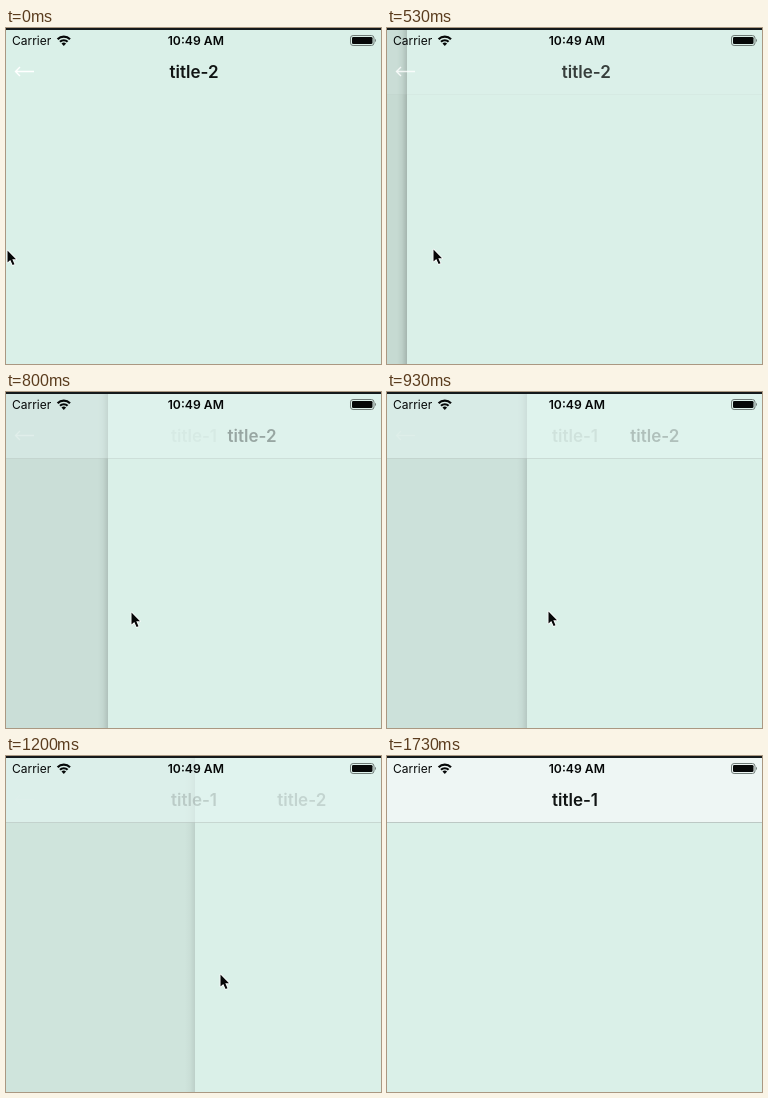
An HTML page for the animation above (2740 ms loop, 375 by 336 pixels).

```html
<!DOCTYPE html>
<html lang="en">
<head>
<meta charset="utf-8">
<title>Swipe back</title>
<style>
html, body { margin: 0; width: 100%; height: 100%; overflow: hidden; background: #daf0e8; }
svg { display: block; width: 100vw; height: 100vh; }
text { font-family: Inter, Roboto, sans-serif; fill: #060808; }
.title { font-size: 17px; font-weight: 600; text-anchor: middle; fill: #101413; }
.status { font-size: 12px; }
.clock { font-size: 12.2px; font-weight: 600; text-anchor: middle; }
</style>
</head>
<body>
<svg viewBox="0 0 375 336">
  <defs>
    <linearGradient id="shade">
      <stop offset="0" stop-color="#000" stop-opacity="0"/>
      <stop offset=".5" stop-color="#000" stop-opacity=".05"/>
      <stop offset="1" stop-color="#000" stop-opacity=".18"/>
    </linearGradient>
  </defs>
  <rect width="375" height="336" fill="#daf0e8"/>
  <rect id="dim" height="336"/>
  <rect id="shadow" width="10" height="336" fill="url(#shade)"/>
  <g id="bar">
    <rect width="375" height="66" fill="#e5f6f3"/>
    <rect id="settled" width="375" height="66" fill="#eef6f4"/>
    <rect y="66" width="375" height="1" fill="#bcc8c4"/>
  </g>
  <path id="back" d="M28 43.5H9.5M14 39L9.5 43.5L14 48" fill="none" stroke="#fff" stroke-width="1.4"/>
  <text id="prev" class="title" x="188" y="50">title-1</text>
  <text id="next" class="title" x="188" y="50">title-2</text>
  <rect width="375" height="2" fill="#14191b"/>
  <text class="status" x="6" y="17">Carrier</text>
  <g fill="none" stroke="#060808" stroke-width="2.2">
    <path d="M51.6 11.2A8.6 8.6 0 0 1 64 11.2"/>
    <path d="M54 13.8A5.4 5.4 0 0 1 61.6 13.8"/>
  </g>
  <path d="M57.8 18L55.5 15.6A3.2 3.2 0 0 1 60.1 15.6Z" fill="#060808"/>
  <text class="clock" x="189.8" y="17">10:49 AM</text>
  <rect x="344.5" y="7.5" width="23.5" height="10" rx="2.6" fill="none" stroke="#6f7b77"/>
  <rect x="346" y="9" width="20.5" height="7" rx="1.3" fill="#060808"/>
  <path d="M369 10.8Q371 12.5 369 14.2Z" fill="#6f7b77"/>
  <path id="cursor" d="M.5 .5V12.5L3.3 10L5.6 15L7.5 14.2L5.3 9.2H9Z"
    fill="#060808" stroke="#fff" stroke-width="1.6" stroke-linejoin="round" paint-order="stroke"/>
</svg>
<script>
const LOOP = 2740, STEP = 200 / 3, W = 375;
const DRAG_START = 400, END = 1733, LEG = 4 * STEP;
// evenly spaced way points of the drag, one per LEG
const EDGE = [-22, 63, 140, 189, 265, W];
const FINGER = [4, 89, 161, 214, 292, 360];

const $ = id => document.getElementById(id);
const set = (id, attrs) => {
  for (const k in attrs) $(id).setAttribute(k, attrs[k]);
};

function along(points, t) {
  const last = points.length - 1;
  const u = Math.min(last, Math.max(0, (t - DRAG_START) / LEG));
  const i = Math.min(last - 1, Math.floor(u));
  return points[i] + (points[i + 1] - points[i]) * (u - i);
}

function draw(time) {
  const n = Math.floor((time + 4) / STEP);
  const t = Math.round(n * STEP);
  const edge = Math.max(0, Math.round(along(EDGE, t)));
  const p = edge / W;
  const x = n ? Math.round(along(FINGER, t)) : 1;
  const y = Math.round(222.4 - .022 * x);

  set("dim", { width: edge, opacity: .1 * (1 - p) });
  set("shadow", { x: edge - 10, opacity: edge ? 1 - p : 0 });
  set("bar", { opacity: p ** .7 });
  set("settled", { opacity: p ** 6 });
  set("back", { opacity: (1 - p) ** 4 });
  set("prev", { opacity: p ** 2.7 });
  set("next", { x: 188 + edge * .57, opacity: Math.exp(-4 * p) });
  set("cursor", {
    transform: `translate(${x} ${y})`,
    visibility: t < END ? "visible" : "hidden"
  });
}

const start = performance.now();
function tick() {
  draw((performance.now() - start) % LOOP);
  requestAnimationFrame(tick);
}
tick();
</script>
</body>
</html>
```
